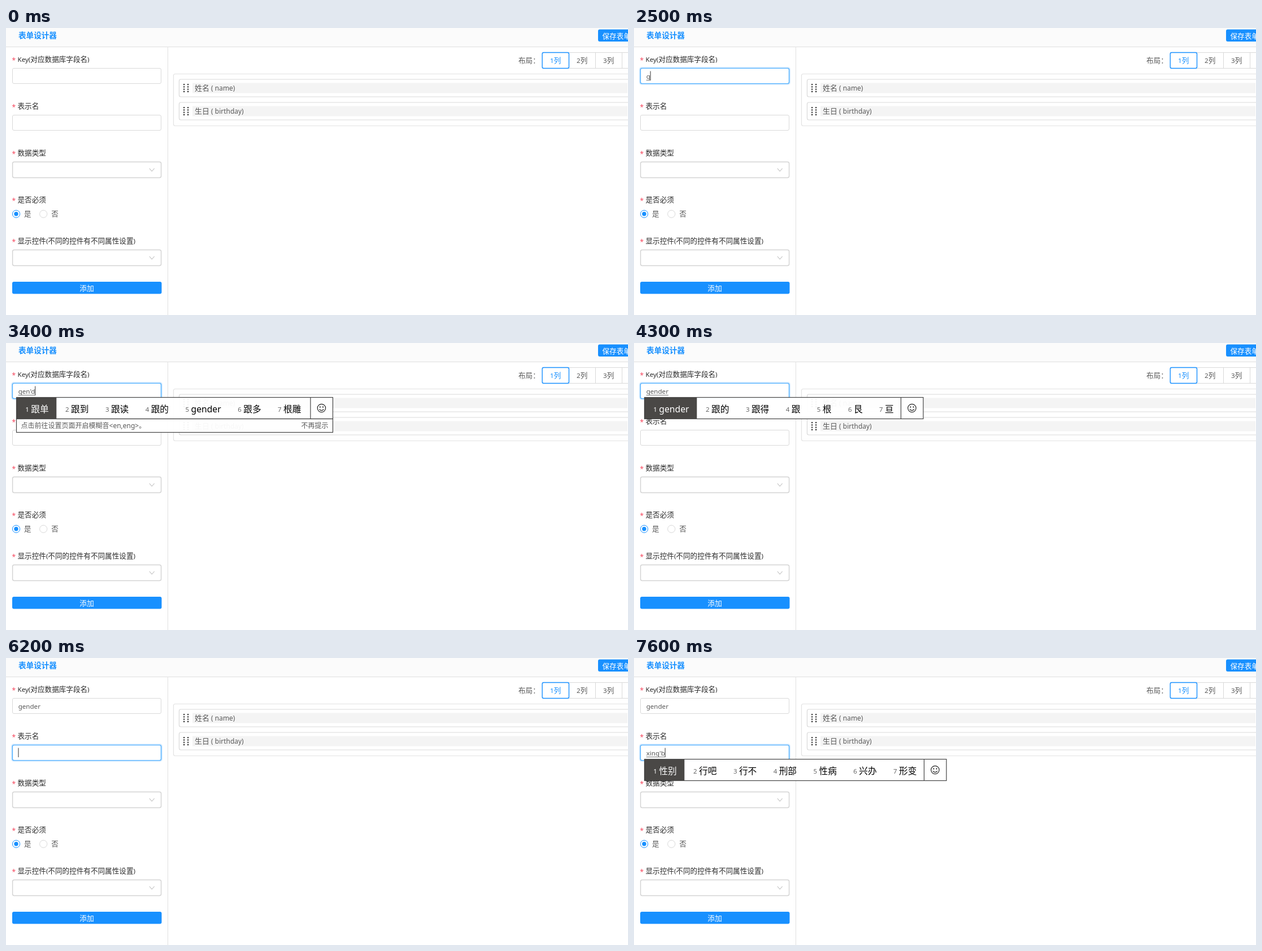
Recreate the animation shown at these times as an HTML page. Size 1101 px wide and 509 px high, loop 8000 ms.

```html
<!DOCTYPE html>
<html lang="zh-CN">
<head>
<meta charset="utf-8">
<title>表单设计器</title>
<style>
html, body { margin: 0; width: 100%; height: 100%; overflow: hidden; background: #fff; }
svg { display: block; width: 1101px; height: 509px; font-family: 'Noto Sans', 'Noto Sans CJK SC', 'Noto Sans CJK', sans-serif; }
text { white-space: pre; }
tspan { font-size: .92em; }
.popup tspan { font-size: 1em; }
</style>
</head>
<body>
<svg viewBox="0 0 1101 509"><g id="form"></g><g id="live"></g></svg>
<script>
const BLUE = '#1890ff', GREY = '#d9d9d9', DARK = '#2b2b2b', SOFT = '#595959';
const LOOP = 8000, TICK = 100, FIELD_GAP = 83, TEXT_X = 21.7;
const form = document.getElementById('form'), live = document.getElementById('live');

const rect = (x, y, w, h, attrs) => `<rect x="${x}" y="${y}" width="${w}" height="${h}" ${attrs}/>`;
const box = (x, y, w, h, stroke = GREY, width = 1, r = 2.5) =>
  rect(x, y, w, h, `rx="${r}" fill="none" stroke="${stroke}" stroke-width="${width}"`);
const line = (d, stroke, width = 1) => `<path d="${d}" fill="none" stroke="${stroke}" stroke-width="${width}"/>`;
// Latin runs get their own tspan so they can be sized apart from the Chinese glyphs.
const text = (x, y, s, fill = DARK, size = 12.6, attrs = '') =>
  `<text x="${x}" y="${y}" fill="${fill}" font-size="${size}" ${attrs}>${s.replace(/[ -~]+/g, '<tspan>$&</tspan>')}</text>`;

const label = (y, s) => text(10.5, y + 7.2, '*', '#f5455c', 13) + text(20.5, y + 4.6, s);
const select = y => box(11.6, y + .6, 263, 27.8, '#d4d4d4', 1.5, 3)
  + line(`M253.8 ${y + 12}l4.4 5l4.4 -5`, '#bfbfbf', 1.1);
const radio = (x, s, on) => `<circle cx="${x}" cy="329.8" r="6.6" fill="none" stroke="${on ? BLUE : GREY}"/>`
  + (on ? `<circle cx="${x}" cy="329.8" r="3.7" fill="${BLUE}"/>` : '') + text(x + 14, 334.4, s, SOFT);

function row(y, s) {
  let out = box(306.5, y + .5, 820, 31, GREY, 1.2, 3) + rect(330, y + 7, 770, 18, 'fill="#f4f4f4"');
  for (let i = 0; i < 8; i++)
    out += rect(314 + i % 2 * 7, y + 8.5 + (i >> 1) * 4.2, 2.3, 2.3, 'rx=".6" fill="#333"');
  return out + text(334, y + 20.6, s, SOFT, 13);
}

form.innerHTML =
  rect(0, 0, 1101, 33, 'fill="#fbfbfb"') + line('M0 33.5H1101M286.5 34V509', '#e0e0e0')
  + text(22, 17.8, '表单设计器', BLUE, 13.6, 'font-weight="bold"')
  + rect(1048, 2.5, 70, 21.5, `rx="3" fill="${BLUE}"`) + text(1055.5, 18.6, '保存表单', '#fff')
  + label(55, 'Key(对应数据库字段名)') + label(138, '表示名') + label(221, '数据类型')
  + label(304, '是否必须') + label(377, '显示控件(不同的控件有不同属性设置)')
  + box(11.5, 71.5, 263, 27) + box(11.5, 154.5, 263, 27)
  + select(237) + select(393) + radio(18, '是', true) + radio(66.2, '否')
  + rect(11, 450, 264.5, 21.5, `rx="3" fill="${BLUE}"`)
  + text(143, 465.7, '添加', '#fff', 12.8, 'text-anchor="middle"')
  + text(907, 62.4, '布局：', SOFT)
  + box(996.5, 43.5, 150, 28, GREY, 1, 0) + line('M1043.5 44V71M1090.5 44V71', GREY)
  + box(949.2, 43.5, 47.3, 28, BLUE, 1.4)
  + text(963, 62.4, '1列', BLUE) + text(1010, 62.4, '2列', SOFT) + text(1057, 62.4, '3列', SOFT)
  + box(296.5, 81.5, 830, 92, '#e2e2e2', 1.2, 3)
  + row(90.5, '姓名 ( name)') + row(131.5, '生日 ( birthday)');

// [start ms, field, text, caret shown, composing, candidates, hint]
const GEN = '跟 根 艮 亘 哏 茛 亙', GEND = '跟单 跟到 跟读 跟的 gender 跟多 根雕';
const GENDE = '跟的 跟得 gender 跟 根 艮 亘', EN = 'en,eng', IN = 'in,ing';
const steps = [
  [0, 0, '', 0], [1600, 0, '', 1], [2100, 0, '', 0],
  [2500, 0, 'g', 1, 1],
  [2600, 0, 'g', 1, 1, '个 过 给 高 跟 国 该'],
  [2700, 0, 'ge', 1, 1, '个 各 歌 格 哥 隔 革'],
  [2800, 0, 'gen', 1, 1, GEN, EN], [3300, 0, 'gen', 0, 1, GEN, EN],
  [3400, 0, "gen'd", 1, 1, GEND, EN],
  [3700, 0, "gen'de", 1, 1, GENDE, EN], [3800, 0, 'gender', 1, 1, GENDE, EN],
  [3900, 0, 'gender', 1, 1, 'gender 跟的 跟得 跟 根 艮 亘'],
  [4300, 0, 'gender', 0, 1, 'gender 跟的 跟得 跟 根 艮 亘'],
  [4700, 0, 'gender', 1], [5100, 0, 'gender', 0], [5700, 0, 'gender', 1],
  [5800, 1, '', 0], [6000, 1, '', 1], [6500, 1, '', 0],
  [7000, 1, 'x', 1, 1],
  [7100, 1, 'x', 1, 1, '下 先 想 小 向 行 像'],
  [7200, 1, 'xi', 1, 1, '系 西 洗 喜 细 戏 吸'],
  [7300, 1, 'xin', 1, 1, '新 心 信 辛 欣 芯 薪', IN],
  [7400, 1, 'xing', 1, 1, '行 性 型 星 姓 形 兴', IN],
  [7600, 1, "xing'b", 1, 1, '性别 行吧 行不 刑部 性病 兴办 形变']
];

function popup(y, words, hint) {
  const left = 18.5, ink = '#444';
  let x = left, cells = '';
  words.split(' ').forEach((word, i) => {
    const w = 39.4 + word.length * (/[a-z]/.test(word) ? 8.9 : 15.7);
    if (!i) cells += rect(x, y, w, 38, 'fill="#4a4846"');
    cells += text(x + 15.8, y + 25.6, `${i + 1}`, i ? '#666' : '#fff', 11.5)
      + text(x + 25.8, y + 26, word, i ? '#000' : '#fff', 15.7);
    x += w;
  });
  const sep = hint ? 539 : Math.round(x) - .5, right = sep + 39.5;
  const cx = sep + 19.5, cy = y + 19;
  let out = rect(left, y, right - left, hint ? 62 : 38, 'fill="#fff" fill-opacity=".95"') + cells
    + line(`M${sep} ${y}v38`, ink, 1.2)
    + `<circle cx="${cx}" cy="${cy}" r="7.2" fill="none" stroke="#222" stroke-width="1.2"/>`
    + `<circle cx="${cx - 2.6}" cy="${cy - 2}" r="1.1"/><circle cx="${cx + 2.6}" cy="${cy - 2}" r="1.1"/>`
    + line(`M${cx - 4} ${cy + 1.8}q4 4.6 8 0`, '#222', 1.2)
    + box(left, y, right - left, 38, ink, 1.2, 0);
  if (hint) out += box(left, y + 38, right - left, 24, ink, 1.2, 0)
    + text(26.5, y + 54.6, `点击前往设置页面开启模糊音&lt;${hint}>。`, SOFT, 12)
    + text(522.5, y + 54.6, '不再提示', SOFT, 12);
  return `<g class="popup">${out}</g>`;
}

const ramp = (t, start) => {
  const p = Math.min(1, Math.max(0, (t - start) / 500));
  return 1 - (1 - p) ** 2;
};
const focusRing = (y, p) => p <= 0 ? '' : `<g opacity="${p}">`
  + box(10, y - 1, 266, 30, 'rgba(24,144,255,.2)', 2, 4) + box(11.5, y + .5, 263, 27, '#40a9ff', 1.2) + '</g>';

function render(t) {
  const [, field, value, caret, composing, words, hint] = steps.findLast(s => s[0] <= t);
  const top = 71 + field * FIELD_GAP;
  live.innerHTML = focusRing(71, ramp(t, 1300) - ramp(t, 5700)) + focusRing(154, ramp(t, 5700))
    + (field ? text(TEXT_X, 90, 'gender', SOFT) : '')
    + text(TEXT_X, top + 19, value, SOFT, 12.6, 'id="typed"');
  const end = TEXT_X + (value ? document.getElementById('typed').getComputedTextLength() : 0);
  live.innerHTML += (composing ? line(`M${TEXT_X} ${top + 21.5}H${end}`, '#777') : '')
    + (caret ? rect(end - .2, top + 5.5, 1, 16.5, 'fill="#333"') : '')
    + (words ? popup(top + 25.5, words, hint) : '');
}

const start = performance.now();
let shown = -1;
function tick() {
  const t = Math.floor((performance.now() - start) % LOOP / TICK) * TICK;
  if (t !== shown) render(shown = t);
  requestAnimationFrame(tick);
}
tick();
</script>
</body>
</html>
```
